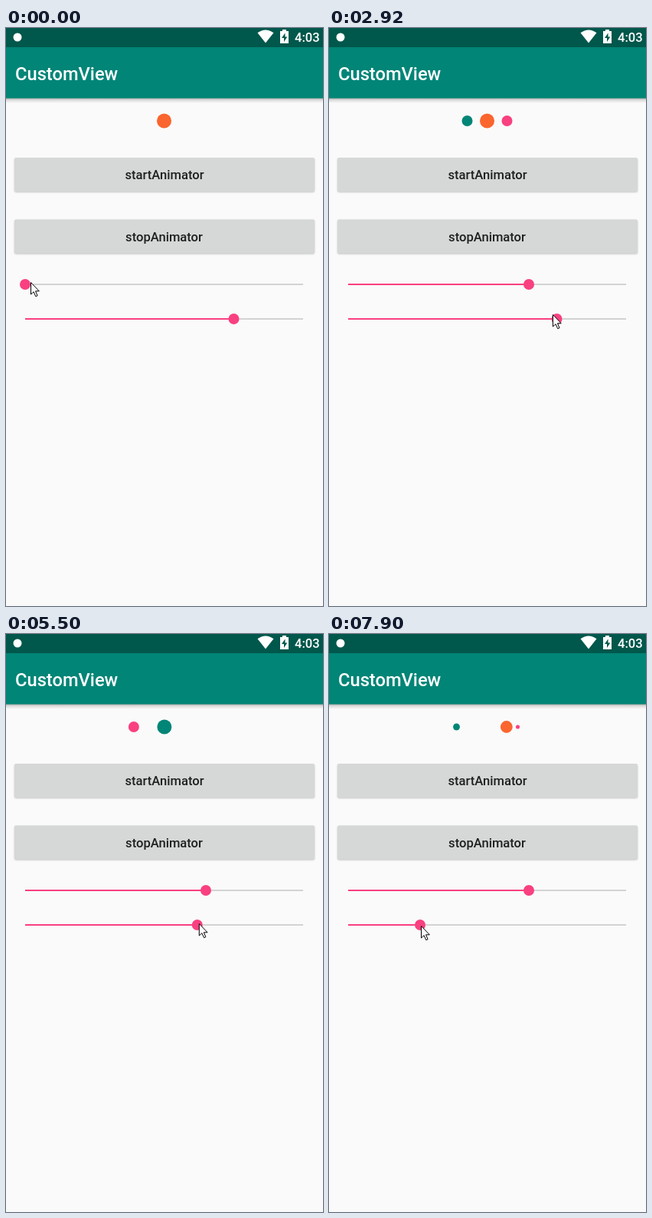
An HTML page that plays this animation: 414 px wide and 753 px high, repeating every 8 s.

```html
<!DOCTYPE html>
<html lang="en">
<head>
<meta charset="utf-8">
<title>CustomView</title>
<style>
  html, body { margin: 0; height: 100%; overflow: hidden; background: #fafafa; }
  svg { display: block; width: 100vw; height: 100vh; font: 500 16.6px Roboto, sans-serif; }
  .label { text-anchor: middle; fill: #1e1f1f; }
  .track { fill: #d3d3d3; }
  .pink { fill: #f94080; }
  .button { fill: #d6d7d7; }
  .button-shadow { fill: #000; opacity: .22; filter: blur(1px); }
</style>
</head>
<body>
<svg viewBox="0 0 414 753">
  <defs>
    <linearGradient id="shade" x2="0" y2="1">
      <stop stop-opacity=".36"/>
      <stop offset=".4" stop-opacity=".12"/>
      <stop offset="1" stop-opacity="0"/>
    </linearGradient>
    <clipPath id="startClip"><rect x="11" y="169" width="392" height="44" rx="2"/></clipPath>
  </defs>

  <rect y="91" width="414" height="7" fill="url(#shade)"/>
  <rect y="25" width="414" height="66.5" fill="#008577"/>
  <rect width="414" height="25" fill="#00574b"/>
  <g fill="#fff">
    <circle cx="15" cy="12" r="5.5"/>
    <path d="M339 19.5 328.5 6.2Q339-1.4 349.5 6.2Z"/>
    <path d="M361 2h5v2h3v16h-11V4h3z"/>
    <text x="377" y="17.8">4:03</text>
    <text x="12" y="68" font-size="23.7">CustomView</text>
  </g>
  <path d="M364.5 6.5 360 13h3v5l4.3-6.5h-2.8z" fill="#00574b"/>

  <rect class="button-shadow" x="11" y="170" width="392" height="44" rx="2"/>
  <rect class="button" x="11" y="169" width="392" height="44" rx="2"/>
  <circle id="ripple" cx="197" cy="199" clip-path="url(#startClip)"/>
  <text class="label" x="207" y="197">startAnimator</text>

  <rect class="button-shadow" x="11" y="250.5" width="392" height="44" rx="2"/>
  <rect class="button" x="11" y="249.5" width="392" height="44" rx="2"/>
  <text class="label" x="206.5" y="278">stopAnimator</text>

  <circle id="green" cy="121" fill="#008577"/>
  <circle id="pink" cy="121" fill="#f94080"/>
  <circle id="orange" cy="121" fill="#fb652e"/>

  <g id="spread" transform="translate(25 334)">
    <rect class="track" y="-1" width="363" height="2"/>
    <rect class="pink" y="-1" height="2"/>
    <circle r="18.5"/>
    <circle class="pink"/>
  </g>
  <g id="speed" transform="translate(25 379)">
    <rect class="track" y="-1" width="363" height="2"/>
    <rect class="pink" y="-1" height="2"/>
    <circle r="18.5"/>
    <circle class="pink"/>
  </g>

  <path id="cursor" d="M.5.5v15.5l3.6-3.3 2.7 6 2.3-1-2.6-5.9h4.8z" fill="#fff" stroke="#000"/>
</svg>

<script>
const LOOP = 8000, START = 4280, SPAN = 363, CENTER = 206.5, REACH = 40;

// Stops of the pointer: time, x, y.
const POINTER = [
  [149, 32, 331], [150, 26, 331], [600, 32, 333], [1650, 257, 335], [1990, 257, 335],
  [2920, 292, 373], [3520, 250, 377], [4000, 195, 205], [4250, 197, 198], [4690, 258, 275],
  [5500, 252, 377], [6150, 123, 378], [6460, 152, 394], [6900, 166, 432], [7900, 120, 380],
];

const $ = id => document.getElementById(id);
const clamp = (v, lo = 0, hi = 1) => Math.min(hi, Math.max(lo, v));
const ramp = (t, from, to) => clamp((t - from) / (to - from));

// Rises at `down`, falls over `fade` ms after `up`.
const press = (t, down, up, fade) => ramp(t, down, down + 150) * (1 - ramp(t, up, up + fade));

function set(el, attrs) {
  for (const name in attrs) el.setAttribute(name, attrs[name]);
}

function pointerAt(t) {
  const i = POINTER.findIndex(stop => t < stop[0]);
  if (i < 1) return POINTER.at(i).slice(1);
  const [from, x, y] = POINTER[i - 1], [to, nextX, nextY] = POINTER[i];
  const k = ramp(t, from, to);
  return [x + k * (nextX - x), y + k * (nextY - y)];
}

function drawSlider(el, x, thumbPress, haloPress) {
  const [, bar, halo, thumb] = el.children;
  set(bar, { width: x });
  set(halo, { cx: x, opacity: .125 * haloPress });
  set(thumb, { cx: x, r: 7 + 3.5 * thumbPress });
}

// Phases: grow at left, move to centre, move to right, shrink away.
function drawCycling(dot, phase) {
  const offset = phase % 4 - 2, d = Math.abs(offset);
  set(dot, {
    cx: CENTER + REACH * clamp(offset, -1, 1),
    r: d < 1 ? 9.5 - 2.5 * d : 7 * (2 - d),
  });
}

function drawDots(t, spread, speed) {
  if (t < START) {
    set($("green"), { cx: CENTER - REACH * spread, r: 7 });
    set($("pink"), { cx: CENTER + REACH * spread, r: 7 });
    set($("orange"), { cx: CENTER, r: 9.5 });
    return;
  }
  // The phase length follows the second slider; its fast drag skips two phases.
  const elapsed = (t - START) / (1000 * speed - 11.5);
  const phase = elapsed < 4 ? elapsed + 2 : elapsed;
  drawCycling($("orange"), phase);
  drawCycling($("pink"), phase + 1);
  drawCycling($("green"), phase + 2);
}

function draw(now) {
  const t = now % LOOP;
  const spreadX = 236 * ramp(t, 620, 1683);
  const speedX = 272.5 - 43.5 * ramp(t, 3120, 3520) - 135 * ramp(t, 5480, 6150);
  const firstPress = fade => press(t, 500, 1570, fade);
  const laterPresses = fade => press(t, 3070, 3550, fade) + press(t, 5500, 6260, fade);

  drawSlider($("spread"), spreadX, firstPress(150), firstPress(350));
  drawSlider($("speed"), speedX, laterPresses(150), laterPresses(350));
  drawDots(t, spreadX / SPAN, speedX / SPAN);
  set($("ripple"), { r: 230 * ramp(t, 4080, 4450), opacity: .09 * press(t, 4080, 4400, 350) });
  set($("cursor"), { transform: `translate(${pointerAt(t)})` });
  requestAnimationFrame(draw);
}
draw(performance.now());
</script>
</body>
</html>
```
